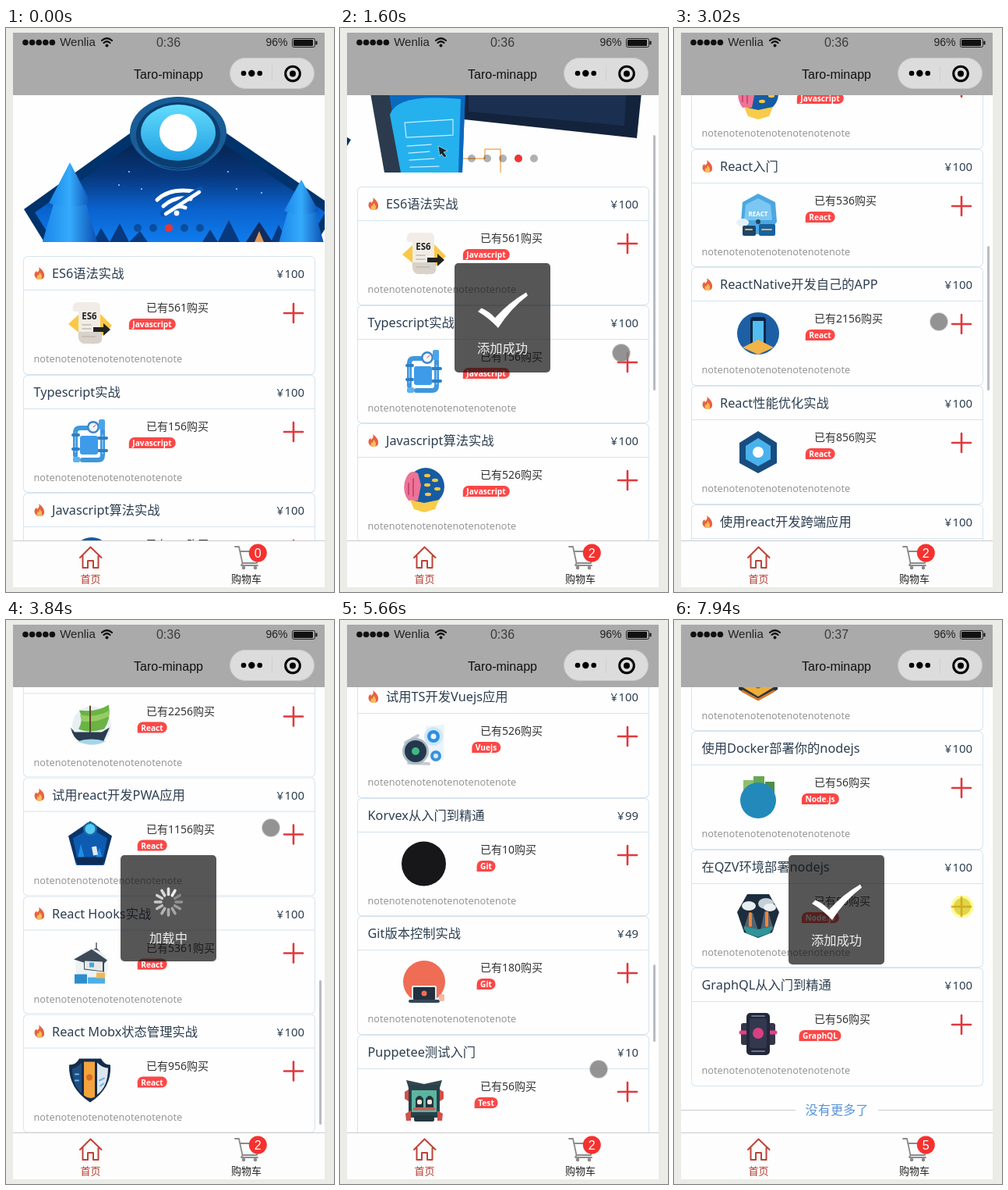
An HTML page for the animation above (8 s loop, 421 by 722 pixels).

```html
<!DOCTYPE html>
<html lang="zh-CN">
<head>
<meta charset="utf-8">
<title>Taro-minapp</title>
<style>
html, body { margin: 0; width: 421px; height: 722px; overflow: hidden; background: #ebebe7; }
body { position: relative; font-family: 'Noto Sans', 'Noto Sans CJK SC', 'Noto Sans CJK', sans-serif; color: #2c3e50; }
body *, body > svg { position: absolute; white-space: nowrap; }
svg { overflow: visible; }
.bar text { font-family: 'Liberation Sans', Arial, sans-serif; }
#page { left: 9px; top: 86px; width: 400px; height: 570px; overflow: hidden; background: #fefefe; }
#scroll { left: 0; top: 0; width: 400px; }
#banner { width: 400px; height: 188px; overflow: hidden; }
#list { left: 13px; top: 206px; width: 375px; overflow: hidden; }
.card { width: 375px; height: 151.6px; border-radius: 6px; box-shadow: inset 0 0 0 1px #d6e4ef; line-height: 20px; }
.card hr { margin: 0; border: 0; left: 1px; right: 1px; top: 43px; height: 1px; background: #d6e4ef; }
.card .title { left: 13.5px; top: 12px; font-size: 16.3px; }
.hot .title { left: 37px; }
.price { right: 14px; top: 12px; font-size: 14.9px; }
.price b { position: static; font-weight: 400; margin-right: 1.5px; }
.count { left: 158px; top: 56px; font-size: 14px; color: #333; }
.tag { left: 165.5px; top: 80px; padding: 0 5px; transform: translateX(-50%); border-radius: 7px 7px 7px 0;
  background: #fc4747; color: #fff; font: 600 10.2px/14px 'Noto Sans', sans-serif; }
.note { left: 13.5px; top: 121px; font-size: 12.7px; color: #969696; }
#end { left: 0; top: 3258px; width: 400px; text-align: center; font-size: 16.2px; line-height: 20px; color: #5b93d8; }
#end i { top: 10px; width: 147px; height: 1px; background: #ccc; }
#thumb { left: 393px; width: 3px; border-radius: 2px; background: #b9bbc1; }
#toast { left: 147px; top: 301px; width: 123px; border-radius: 5px; background: rgba(17,17,17,.7); }
#toast span { left: 0; width: 123px; text-align: center; font-size: 16.3px; line-height: 20px; color: #eee; }
</style>
</head>
<body>
<div id="page">
  <div id="scroll">
    <div id="banner"><svg id="slides" width="800" height="188"></svg><svg id="dots" width="400" height="188"></svg></div>
    <div id="list"></div>
    <div id="end"><i style="left:0"></i><i style="right:0"></i>没有更多了</div>
  </div>
  <div id="thumb"></div>
</div>
<svg id="frame" class="bar" width="421" height="722"></svg>
<div id="toast"><svg id="sign" width="123" height="140"></svg><span></span></div>
<svg id="cursor" width="1" height="1"></svg>
<script>
const $ = id => document.getElementById(id);
const P = (d, fill, more = '') => `<path d="${d}" fill="${fill}" ${more}/>`;
const L = (d, stroke, w = 2) => P(d, 'none', `stroke="${stroke}" stroke-width="${w}" stroke-linecap="round" stroke-linejoin="round"`);
const C = (x, y, r, fill, more = '') => `<circle cx="${x}" cy="${y}" r="${r}" fill="${fill}" ${more}/>`;
const E = (x, y, rx, ry, fill) => `<ellipse cx="${x}" cy="${y}" rx="${rx}" ry="${ry}" fill="${fill}"/>`;
const R = (x, y, w, h, fill, r = 0) => `<rect x="${x}" y="${y}" width="${w}" height="${h}" rx="${r}" fill="${fill}"/>`;
const T = (x, y, s, size, fill, more = '') => `<text x="${x}" y="${y}" font-size="${size}" fill="${fill}" text-anchor="middle" ${more}>${s}</text>`;
const bold = 'font-weight="700"';

// title, hot, price, buyers, tag, artwork centred on 0,0
const items = [
  ['ES6语法实战', 1, 100, 561, 'Javascript',
    P('M0-24L28 4 4 28-28 2Z', '#fbc845') + P('M-18-26H7Q13-26 13-19V18H-15V-14H-21Q-25-21-18-26Z', '#f1ede6') +
    P('M-15 12H14Q18 27 9 27H-9Q-17 24-15 12Z', '#d8d2ca') + T(-1, -4, 'ES6', 11.5, '#222', bold) +
    P('M4 6H17V1L26 9 17 17V12H4Z', '#222') + L('M-10 3H1M-10 8H1M-10 18H7', '#c2bbb0', 1.5)],
  ['Typescript实战', 0, 100, 156, 'Javascript',
    L('M-19 18V-11Q-19-17-13-17H0M16-14V18Q16 24 10 24H-10', '#3f97dd', 6) + L('M-19 14V-10M16-8V16', '#8cccf6', 1.5) +
    L('M-22-8H-15M-22 10H-15M11-4H21M11 12H21', '#2d7fc4', 4) +
    R(-13, -7, 23, 24, '#3d9be9', 3) + C(4, -18, 8, '#3a86cc') + C(4, -18, 5.5, '#f1f6fa') + L('M4-18L7-21', '#d44', 1) +
    R(11, -28, 8, 13, '#4ca5e8', 2) + R(-22, 20, 9, 7, '#58b3f0', 2)],
  ['Javascript算法实战', 1, 100, 526, 'Javascript',
    C(2, -4, 24, '#155ca3') + P('M-25-10Q-20-28-8-21L-4-6-8 14H-20Q-28 4-25-10Z', '#ee7397') + L('M-20-8V6M-14-14V8', '#c94a73') +
    [[4, -18], [14, -12], [4, -6], [17, -1], [5, 6]].map(([x, y]) => E(x, y, 4, 2.2, '#f6c544')).join('') +
    P('M-18 13L0 17 19 13 14 25 0 29-13 25Z', '#f9cb4a')],
  ['React入门', 1, 100, 536, 'React',
    P('M0-28L22-17 24 8 12 24H-14L-22 8-20-17Z', '#4aa7e2') + P('M-16-14L0-22 16-14 18 6H-18Z', '#7cc7f1') +
    T(0, 1, 'REACT', 8, '#fff', bold) + E(-20, 9, 8, 5, '#e5f0f8') + R(-20, 13, 17, 13, '#1d4568', 2) + R(1, 11, 21, 15, '#17629f', 2) +
    L('M-16 18H-8M5 18H17', '#ecb24c') + C(0, 8, 3, '#24455f')],
  ['ReactNative开发自己的APP', 1, 100, 2156, 'React',
    C(0, 0, 27, '#1d5fa5') + R(-10, -21, 20, 40, '#0d2747', 4) + R(-7, -16, 14, 28, '#54bdf0') + P('M-20 18L0 8 20 18 0 27Z', '#f0b449')],
  ['React性能优化实战', 1, 100, 856, 'React',
    P('M0-27L24-12V14L0 27-24 14V-12Z', '#194d80') + P('M0-18L16-8V9L0 18-16 9V-8Z', '#49b2ec') + C(0, 0, 7, '#fff')],
  ['使用react开发跨端应用', 1, 100, 2256, 'React',
    C(2, 0, 25, '#e8eff3') + P('M-14-20Q8-17 24-27 27-8 18 4-2 10-15 4-8-8-14-20Z', '#6ab344') + P('M-13-14Q8-10 25-20L24-12Q5-3-11-6Z', '#96cc63') +
    L('M0-25V12', '#62452c') + P('M-25 2L-20 8H15L25 2 17 20H-13Q-22 16-25 2Z', '#293d4e') + P('M-17 20Q2 14 20 20 4 28-17 20Z', '#a6d5ea')],
  ['试用react开发PWA应用', 1, 100, 1156, 'React',
    P('M0-29L28-10 18 27H-18L-28-10Z', '#0b3468') + P('M0-20L22-7 15 27H-15L-22-7Z', '#0d5cb2') + C(0, -19, 9, '#1b6da5') + C(0, -19, 6.5, '#58cbf4') +
    P('M-18 27L-12 0-5 27M4 27L12 5 18 27', '#1f8de3') + P('M2 4L8 3 10 14 4 15Z', '#dfe9f3') + P('M-17 27V17H17V27Z', '#0e2c59')],
  ['React Hooks实战', 1, 100, 5361, 'React',
    L('M8-25V-15M8-18L-12-6M8-18L19-6', '#525a62', 1.5) + E(2, 5, 21, 22, '#edf2f4') + P('M-21-4L2-17 22-3 18 1V12L-8 9V0Z', '#3c4a58') +
    P('M-7-2L16-1V11L-7 8Z', '#e5e9ea') + R(-1, 0, 6, 6, '#4aa7d5') + R(-20, 15, 16, 12, '#2d8dcc') + R(-3, 19, 22, 8, '#4bb1e5') + R(8, 13, 11, 7, '#f2b850')],
  ['React Mobx状态管理实战', 1, 100, 956, 'React',
    P('M-27-20Q-18-20-14-28H14Q18-20 26-20 28 10 0 28-28 10-27-20Z', '#132c4c') + P('M-8-24H6V21Q-1 25-8 19Z', '#f3a43d') +
    P('M9-23Q16-16 23-16 23 8 9 18Z', '#dee6ed') + P('M-23-15Q-16-17-11-23V16Q-23 6-23-15Z', '#1f4d80') +
    L('M-19-8H-15M-19 0H-15M12 0L18-3M13 7L17 4', '#69b8ee') + C(-1, -4, 4, '#d96b26')],
  ['Vuejs从入门到精通', 0, 100, 656, 'Vuejs',
    P('M-28-20H28L12 20 0 27-12 20Z', '#1f3347') + C(0, -2, 13, '#41b883') + P('M-28 18L-16 10-10 20ZM28 18L16 10 10 20Z', '#b9c5cc')],
  ['Vuejs开发pwa应用', 1, 100, 596, 'Vuejs',
    C(1, -10, 16, '#223244') + C(1, -9, 5, '#41b883') + P('M-15 2L-8 7 8 4 16-1 17 14 8 26-10 24-17 13Z', '#c94533') + P('M-8 6L8 4 12 13-5 17Z', '#efc5a9') +
    L('M-11 17L-3 21M3 20L12 15', '#6c261f') + R(-1, 9, 8, 5, '#36495c')],
  ['试用TS开发Vuejs应用', 1, 100, 526, 'Vuejs',
    P('M2-25L26-27 25 18 4 14Z', '#eaf4fb') + C(12, -12, 12, '#cfe8fa') + C(12, -12, 8, '#2f8fe0') + C(12, -12, 3.5, '#eaf4fb') + C(15, 13, 7, '#3e93d7') + C(15, 13, 3, '#d9edfa') +
    L('M-24-4L-8-13M-20 22L6 23', '#c3ccd3', 4) + C(-11, 7, 17, '#aeb9c1') + C(-11, 7, 14, '#22384d') + C(-11, 7, 5, '#41b883')],
  ['Korvex从入门到精通', 0, 99, 10, 'Git', C(-.5, -1, 28.5, '#17171a')],
  ['Git版本控制实战', 0, 49, 180, 'Git',
    C(0, -1, 27, '#ef6c55') + R(-16, 4, 32, 19, '#e5e9ea', 2) + R(-14, 6, 28, 16, '#22303f', 1) + C(0, 14, 3.5, '#ef6c55') + R(-20, 22, 40, 4, '#34475a', 2) +
    R(19, 15, 7, 9, '#f6b9a6', 2)],
  ['Puppetee测试入门', 0, 10, 56, 'Test',
    P('M-23-27L0-22 23-27 20-17H-20Z', '#314750') + R(-20, -21, 40, 42, '#2a4149', 2) + R(-16, -14, 32, 28, '#5cb5a0') +
    P('M-25-12L-20-15V0L-25-3ZM25-12L20-15V0L25-3ZM-24 16L-17 12V25H-23ZM24 16L17 12V25H23Z', '#cf514b') +
    P('M-11 8V-3Q-6-11-1-3V8Z', '#24343c') + P('M2 8V-3Q7-11 12-3V8Z', '#24343c') + R(-9, -2, 6, 6, '#f3e8db', 2) + R(4, -2, 6, 6, '#f3e8db', 2) +
    L('M-13 10H13', '#d7564e', 3) + R(-13, 18, 26, 8, '#233840', 2)],
  ['Nodejs从入门到精通', 0, 100, 256, 'Node.js',
    P('M0-28L25-14V13L0 27-25 13V-14Z', '#263442') + P('M-20 10L0-2 20 10 0 22Z', '#efad3b') + P('M-14-10L0-18 14-10V4L0 12-14 4Z', '#48834b') + L('M-20 15L0 26 20 15', '#d47b2a', 3)],
  ['使用Docker部署你的nodejs', 0, 100, 56, 'Node.js',
    R(-19, -22, 13, 22, '#8fc06c') + R(-6, -27, 14, 25, '#66a952') + R(9, -20, 12, 18, '#4c8e4b') + C(0, 4, 23, '#2389bb')],
  ['在QZV环境部署nodejs', 0, 100, 56, 'Node.js',
    P('M-14-28H14L27-5 18 21 0 28-18 21-27-5Z', '#1c2d3e') + E(-12, -13, 9, 6, '#e8edef') + E(10, -16, 10, 7, '#c3d0d6') + E(15, -11, 8, 5, '#eef1f2') +
    P('M-19 18L-12-4-7-4 0 18ZM3 18L8-6 13-6 20 18Z', '#536170') + L('M-10-3V12M11-4V12', '#ef853b', 4) + P('M-19 13L0 17 19 13 15 22 0 27-15 22Z', '#2d9499')],
  ['GraphQL从入门到精通', 0, 100, 56, 'GraphQL',
    R(-22, -14, 44, 28, '#343748', 3) + L('M-22-2H-16M16-2H22', '#e83e8c', 5) + R(-15, -27, 30, 54, '#22283a', 5) + R(-11, -20, 22, 38, '#32394f', 3) +
    L('M-8-23H8M-8 22H8', '#69758f') + C(0, -1, 7, '#d84083')]
];
const pitch = 151.6;
const art = (x, y, s) => `<svg width="60" height="60" viewBox="-30 -30 60 60" style="left:${x}px;top:${y}px">${s}</svg>`;
const flame = P('M-1-8Q6-3 6 2 7 7 1 8H-2Q-8 5-6-1L-4-3-3-1Q1-4-1-8Z', '#e7633f') + P('M0-1Q5 3 2 8H-2Q-5 5-2 2L-1 3Z', '#f8bc59');
$('list').innerHTML = items.map(([title, hot, price, buyers, tag, pic], i) =>
  `<div class="card ${hot ? 'hot' : ''}" style="top:${i * pitch}px"><hr><span class="title">${title}</span>
  <span class="price"><b>¥</b>${price}</span><span class="count">已有${buyers}购买</span><span class="tag">${tag}</span>
  <span class="note">${'note'.repeat(7)}</span>${art(56, 55, pic)}${hot ? art(-9, -8, flame) : ''}
  ${art(317, 43, L('M-12 0H12M0-12V12', '#e0393e', 2.6))}</div>`).join('');

// banner artwork
const gradient = (id, across, ...stops) => `<linearGradient id="${id}" x2="${across}" y2="${1 - across}">` +
  stops.map((s, i) => `<stop offset="${i / (stops.length - 1)}" stop-color="${s}"/>`).join('') + '</linearGradient>';
const tree = (x, y, w, h) => P(`M${x - w * .7} ${y + h - 6}H${x + w * .7}L${x + w * 1.3} 274H${x - w * 1.3}Z`, 'url(#bark)') +
  P(`M${x} ${y}L${x + w} ${y + h}Q${x} ${y + h + 10} ${x - w} ${y + h}Z`, 'url(#bark)');
$('slides').innerHTML = '<defs>' + gradient('sky', 0, '#062450', '#07377c', '#0a62cd', '#0f7cee') + gradient('cyan', 0, '#63dcfb', '#209ee4') +
  gradient('bark', 1, '#1a86ea', '#35abfb', '#0a4fb4') + gradient('cover', 0, '#0a5aa8', '#0d76d0') +
  '</defs><g transform="translate(-20 -86)">' +
  P('M23 232L163 132H279L425 232 399 274H49Z', '#00336b') + P('M37 236L165 147 184 170Q222 194 260 170L277 147 410 236 387 274H61Z', 'url(#sky)') +
  E(221, 134, 62, 46, '#195c96') + E(221, 137, 54, 42, '#0b3d70') + E(221, 134, 48, 36, 'url(#cyan)') + C(221, 134, 24, '#fff') +
  L('M168 154Q188 182 222 182T275 154', '#1b6fc0', 1) + L('M158 184V184M145 201V201M174 206V206M285 184V184M296 206V206M328 211V211', '#9ddcff', 2) +
  P('M112 274L122 256 133 274 146 250 158 274 172 260 182 274ZM252 274L262 258 272 274 286 246 300 274ZM340 274L350 252 362 274Z', '#08397f') +
  P('M308 274L325 248 342 274Z', '#122c5c') + P('M319 274L325 260 331 274Z', '#dd9a5c') + tree(82, 172, 27, 52) + tree(379, 194, 22, 40) +
  L('M194 220Q211 203 246 210M202 228Q217 214 237 219M212 233Q220 226 230 230', '#fff', 5) + C(219, 237, 3.4, '#fff') + L('M202 237L249 207', '#0b54b0', 8) + L('M205 238L248 210', '#fff', 4.5) +
  '</g><g transform="translate(172 -86)">' +
  P('M366 87L590 92 612 112 600 230 378 206Z', '#14233c') + P('M384 104L590 112 584 214 384 196Z', '#1b2f50') +
  R(400, 151, 17, 8, '#f0a04a') + L('M388 136H400M388 172H409', '#e5edf5', 2) + L('M376 256H405V244H425V274', '#f0a04a', 1.3) +
  P('M248 116L256 103 274 112 300 274H276Z', '#2b3b4d') + P('M256 102L272 94 362 87 382 110 376 274H298L273 113Z', 'url(#cover)') +
  P('M273 113L382 110 376 274H298Z', '#0c68bd') + P('M283 200Q292 172 374 180L371 274H297Z', '#25b1ee') +
  R(304, 121, 38, 35, '#fff', 3) + L('M302 210L364 206V226L304 229ZM305 240L336 238M307 249L334 247M308 258L340 256M309 267L346 266', '#c9efff', 1.2) +
  P('M345 240L357 246 352 248 356 253 353 255 349 250 347 253Z', '#1b2630', 'stroke="#cfe" stroke-width=".6"') + '</g>';

// status bar, title bar and tab bar
const ink = '#111';
$('frame').innerHTML = R(9, 6, 400, 80, '#aaa') + [25, 33.6, 42.2, 50.8, 59.4].map(x => C(x, 18.5, 3.8, ink)).join('') +
  T(92, 23, 'Wenlia', 15, '#222') + L('M123 16Q129.500 10.500 136 16M125.500 19Q129.500 15.500 133.500 19', ink, 2.2) + C(129.5, 22.5, 2, ink) +
  T(208.5, 24, '0:36', 16, '#3c3c3c', 'id="clock"') + T(347.5, 23, '96%', 14, '#222') +
  '<rect x="367.500" y="13.500" width="29" height="11" rx="2" fill="none" stroke="#222"/>' + R(369, 15, 25, 8, ink, 1) + R(397.5, 16.5, 2, 5, ink, 1) +
  T(208.5, 65, 'Taro-minapp', 16, '#111') +
  '<rect x="287.500" y="38.500" width="108" height="39" rx="19.500" fill="#dcdcdc" stroke="#c9c9c9"/>' + R(341, 48, 1, 20, '#cfcfcf') +
  C(305, 58, 3.3, '#000') + C(315.3, 58, 4.2, '#000') + C(325.7, 58, 3.3, '#000') + C(368, 58.5, 9.3, 'none', 'stroke="#000" stroke-width="3"') + C(368, 58.5, 4, '#000') +
  R(9, 656, 400, 60, '#fdfdfd') + R(9, 656, 400, 1, '#ccc') +
  L('M95 678L108.500 664.500 122.500 678M98.500 676V691H105V682H112V691H118.500V676', '#bd4338', 2) +
  L('M294 664H299L303.500 685H322L326 670H300M303.500 685L302 688H323', '#8b8b8b', 1.8) + C(305, 691, 2.3, '#8b8b8b') + C(320, 691, 2.3, '#8b8b8b') +
  C(323.3, 672, 11.5, '#f5322f') + T(323.3, 677.5, '0', 16, '#fff', 'id="badge"') +
  T(108.5, 710, '首页', 13, '#b63a2f', 'style="font-family:inherit"') + T(308.5, 710, '购物车', 13, '#222', 'style="font-family:inherit"');

// The screen refreshes in bursts: five steps, then a pause
const bursts = [[0, 790], [1190, 830], [2420, 800], [3640, 800], [4840, 820], [6080, 840], [7320, 820]];
function refresh(t) {
  const [start, length] = bursts.filter(b => b[0] <= t + 6).pop();
  return start + Math.min(4, Math.floor((t + 6 - start) / (length / 4))) * length / 4;
}
function track(keys, t, i = 1) {
  const k = keys.findIndex(p => p[0] > t);
  if (k < 0) return keys[keys.length - 1][i];
  if (!k) return keys[0][i];
  const a = keys[k - 1], b = keys[k];
  return a[i] + (b[i] - a[i]) * (t - a[0]) / (b[0] - a[0]);
}
const passed = (marks, t) => marks.filter(m => t >= m).length;
const within = (spans, t) => spans.some(([a, b]) => t >= a && t < b);

const scrollKeys = [[1400, 0], [2020, 269], [2420, 330], [2620, 424], [2820, 424], [3220, 760], [3640, 1020], [3840, 1151.5], [4040, 1151.5],
  [4440, 1500], [4840, 1803], [5045, 1940], [5450, 1940], [5660, 2035], [6080, 2190], [6700, 2727]];
const cursorKeys = [[190, 340, 716], [590, 371, 395], [1400, 371, 395], [2020, 340, 457], [2420, 340, 457], [3840, 340, 266],
  [4440, 345, 420], [4840, 345, 566], [5660, 332, 575], [6080, 332, 575], [6920, 370, 367]];
const slideKeys = [[0, 11], [190, 0], [1060, 0], [1190, -181], [1395, -400]];
const tick = P('M30 62L34.500 57.500Q45 62 52 70 70 50 92 37.500L94 41.500Q72 58 56 83 44 70 30 62Z', '#fff');

function draw(time) {
  const t = refresh(time), y = track(scrollKeys, t);
  const count = 5 + 5 * passed([3000, 4200, 5400], t), height = 236 + count * pitch;
  $('scroll').style.transform = `translateY(${-y}px)`;
  $('list').style.height = count * pitch + 'px';
  $('end').hidden = count < 20;
  $('slides').style.left = track(slideKeys, t) + 'px';
  $('dots').innerHTML = [0, 1, 2, 3, 4].map(i => C(160 + 20 * i, 170, 5, i === (t < 1060 ? 2 : 3) ? '#ea3638' : 'rgba(0,0,0,.3)')).join('');
  $('thumb').hidden = !within([[1420, 6600]], t);
  $('thumb').style.top = y / height * 570 + 'px';
  $('thumb').style.height = 570 * 570 / height + 'px';

  $('clock').textContent = t < 6280 ? '0:36' : '0:37';
  $('badge').textContent = passed([590, 1190, 7520, 7725, 7930], t);

  const loading = within([[2600, 3000], [3800, 4200], [5030, 5400]], t);
  const added = within([[590, 1800], [7520, 8000]], t);
  const toast = $('toast'), label = toast.querySelector('span');
  toast.hidden = !loading && !added;
  toast.style.height = (loading ? 136 : 140) + 'px';
  label.textContent = loading ? '加载中' : '添加成功';
  label.style.top = (loading ? 96 : 99) + 'px';
  const turn = Math.floor(t / 100);
  $('sign').innerHTML = loading ? Array.from({ length: 12 }, (_, i) =>
    `<g transform="translate(61.500 60) rotate(${i * 30})" opacity="${.3 + .6 * ((i - turn % 12 + 12) % 12) / 11}">${L('M0-9.500V-17', '#fff', 3.6)}</g>`).join('') : tick;

  const click = within([[590, 1000], [7520, 8000]], t);
  $('cursor').style.display = t < 190 ? 'none' : '';
  $('cursor').style.left = track(cursorKeys, t, 1) + 'px';
  $('cursor').style.top = track(cursorKeys, t, 2) + 'px';
  $('cursor').innerHTML = click ? C(0, 0, 14.5, 'rgba(255,245,60,.55)') + C(0, 0, 11, 'rgba(190,180,0,.5)')
    : C(0, 0, 12, 'rgba(150,150,150,.4)') + C(0, 0, 11, 'rgba(125,125,125,.75)');
}
function loop(now) {
  draw(now % 8000);
  requestAnimationFrame(loop);
}
draw(0);
requestAnimationFrame(loop);
</script>
</body>
</html>
```
